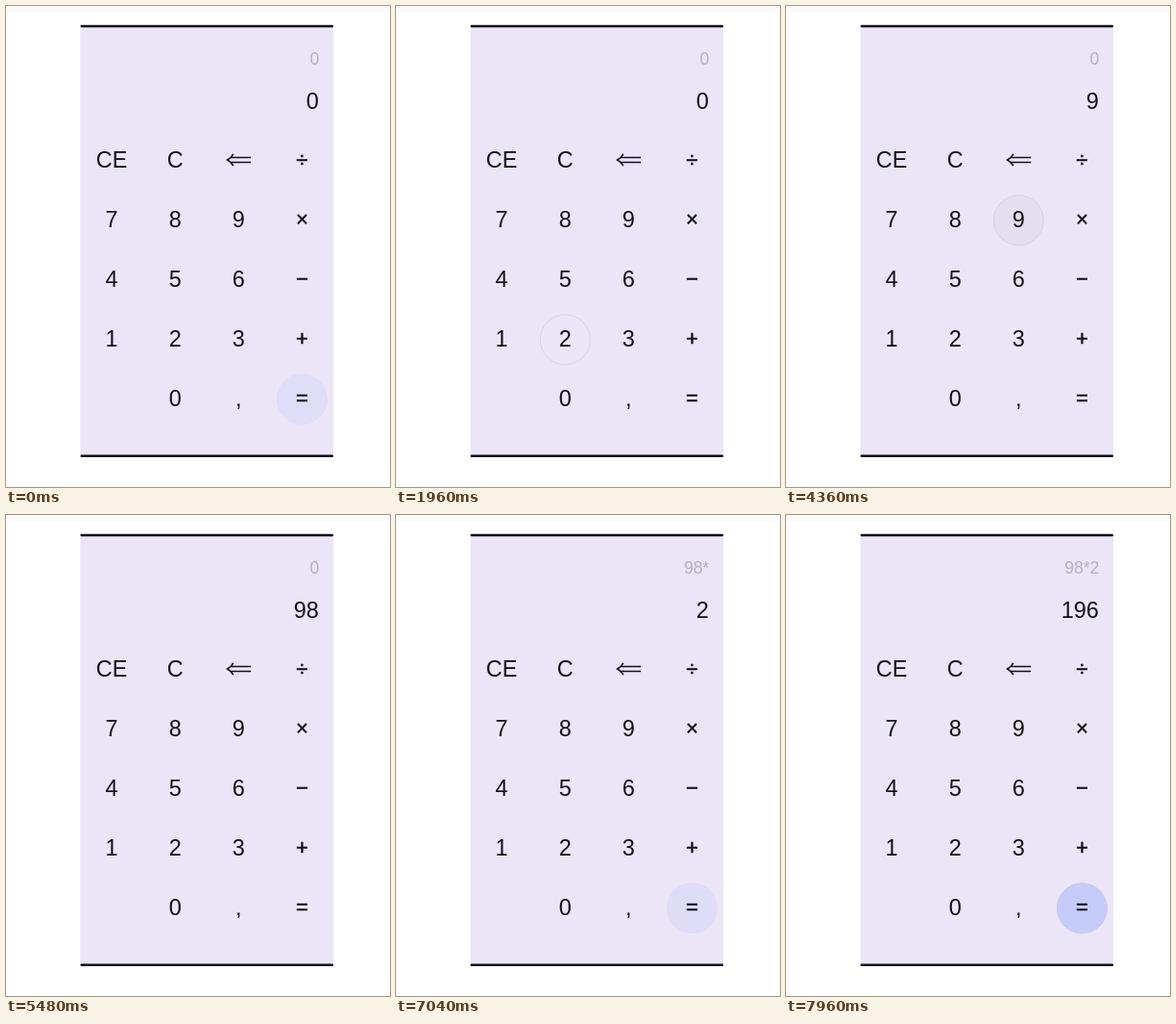
An HTML page that plays this animation: 400x500 px, repeating every 8 s.

```html
<!DOCTYPE html>
<html lang="en">
<head>
<meta charset="utf-8">
<title>Calculator</title>
<style>
  html, body { margin: 0; width: 100%; height: 100%; overflow: hidden; background: #fff; }
  svg { display: block; width: 400px; height: 500px; font-family: "Liberation Sans", Arial, sans-serif; }
  .key, .total { font-size: 23.4px; fill: #111015; }
  .key { text-anchor: middle; }
  .operator { font-size: 22px; stroke: #111015; stroke-width: .5; }
  .total { text-anchor: end; }
  .history { font-size: 17.5px; text-anchor: end; fill: #b6b0c0; }
  .arrow { fill: none; stroke: #111015; stroke-width: 1.6; }
</style>
</head>
<body>
<svg viewBox="0 0 400 500">
  <rect width="400" height="6.5" fill="#fafafa"/>
  <rect x="77.5" y="20.5" width="263.5" height="447.5" fill="#ebe5f7"/>
  <g fill="#0b0910">
    <rect x="77.5" y="19.7" width="263.5" height="2.5" rx="1.2"/>
    <rect x="77.5" y="466.5" width="263.5" height="2.5" rx="1.2"/>
  </g>
  <text class="history" id="history" x="326.2" y="61.3">0</text>
  <text class="total" id="total" x="325.8" y="107.1">0</text>
  <g id="keys"></g>
</svg>
<script>
const LOOP = 8000, HOVER_FADE = 280, PRESS_FADE = 120;
const ROWS = ['CE C ⇐ ÷', '7 8 9 ×', '4 5 6 −', '1 2 3 +', '_ 0 , ='];

// key, pointer enters, pointer leaves, starting strength
const HOVERS = [
  ['=', 0, 820, .3], [',', 1260, 1350], ['2', 1640, 2490],
  ['6', 3220, 3320], ['9', 3740, 4390], ['8', 4540, 5030],
  ['×', 5485, 5830], ['3', 5880, 5930], ['2', 6240, 6590],
  ['=', 7020, 9000, .25]
];
// key, button down, button up
const PRESSES = [
  ['9', 4165, 4390], ['8', 4780, 4940], ['×', 5650, 5810],
  ['2', 6370, 6530], ['=', 7390, 7550]
];
// time, history line, total line
const READOUT = [
  [0, '0', '0'], [4310, '0', '9'], [4910, '0', '98'],
  [5790, '98*', '98'], [6510, '98*', '2'], [7530, '98*2', '196']
];

const el = (name, attrs, parent) => {
  const node = document.createElementNS('http://www.w3.org/2000/svg', name);
  for (const k in attrs) node.setAttribute(k, attrs[k]);
  return parent.appendChild(node);
};

const keyLayer = document.getElementById('keys');
const historyLine = document.getElementById('history');
const totalLine = document.getElementById('total');
const keys = {};

ROWS.forEach((row, r) => row.split(' ').forEach((label, c) => {
  if (label === '_') return;
  const x = 110.1 + 66.1 * c, y = 160.8 + 62 * r;
  const disc = (r, fill, stroke) =>
    el('circle', { cx: x, cy: y, r, fill, stroke, opacity: 0 }, keyLayer);
  const hover = label === '='
    ? disc(26, '#c6ccfa', '#c9c7e6')
    : disc(26, 'none', '#d8d2e2');
  const press = disc(25.8, 'rgba(0,0,0,.033)', 'none');
  if (label === '⇐') {
    el('path', {
      class: 'arrow',
      d: 'M255 157.5H233.5M255 162.5H233.5M236.8 153.8Q234.5 158 230.6 160Q234.5 162 236.8 166.2'
    }, keyLayer);
  } else {
    const operator = c === 3;
    el('text', {
      class: operator ? 'key operator' : 'key',
      x, y: y + (operator ? 6.3 : 7.2)
    }, keyLayer).textContent = label;
  }
  keys[label] = { hover, press };
}));

const clamp = v => Math.max(0, Math.min(1, v));

// Fades up from "from" at start, and down again after end.
function strength(t, start, end, fade, from = 0) {
  if (t < start) return 0;
  const rise = time => clamp(from + (time - start) / fade);
  return t < end ? rise(t) : clamp(rise(end) - (t - end) / fade);
}

function peak(list, label, t, fade) {
  return Math.max(0, ...list.filter(e => e[0] === label)
    .map(([, start, end, from]) => strength(t, start, end, fade, from)));
}

function draw() {
  const t = performance.now() % LOOP;
  for (const label in keys) {
    keys[label].hover.setAttribute('opacity', peak(HOVERS, label, t, HOVER_FADE));
    keys[label].press.setAttribute('opacity', peak(PRESSES, label, t, PRESS_FADE));
  }
  const [, history, total] = READOUT.filter(e => e[0] <= t).pop();
  historyLine.textContent = history;
  totalLine.textContent = total;
  requestAnimationFrame(draw);
}
draw();
</script>
</body>
</html>
```
